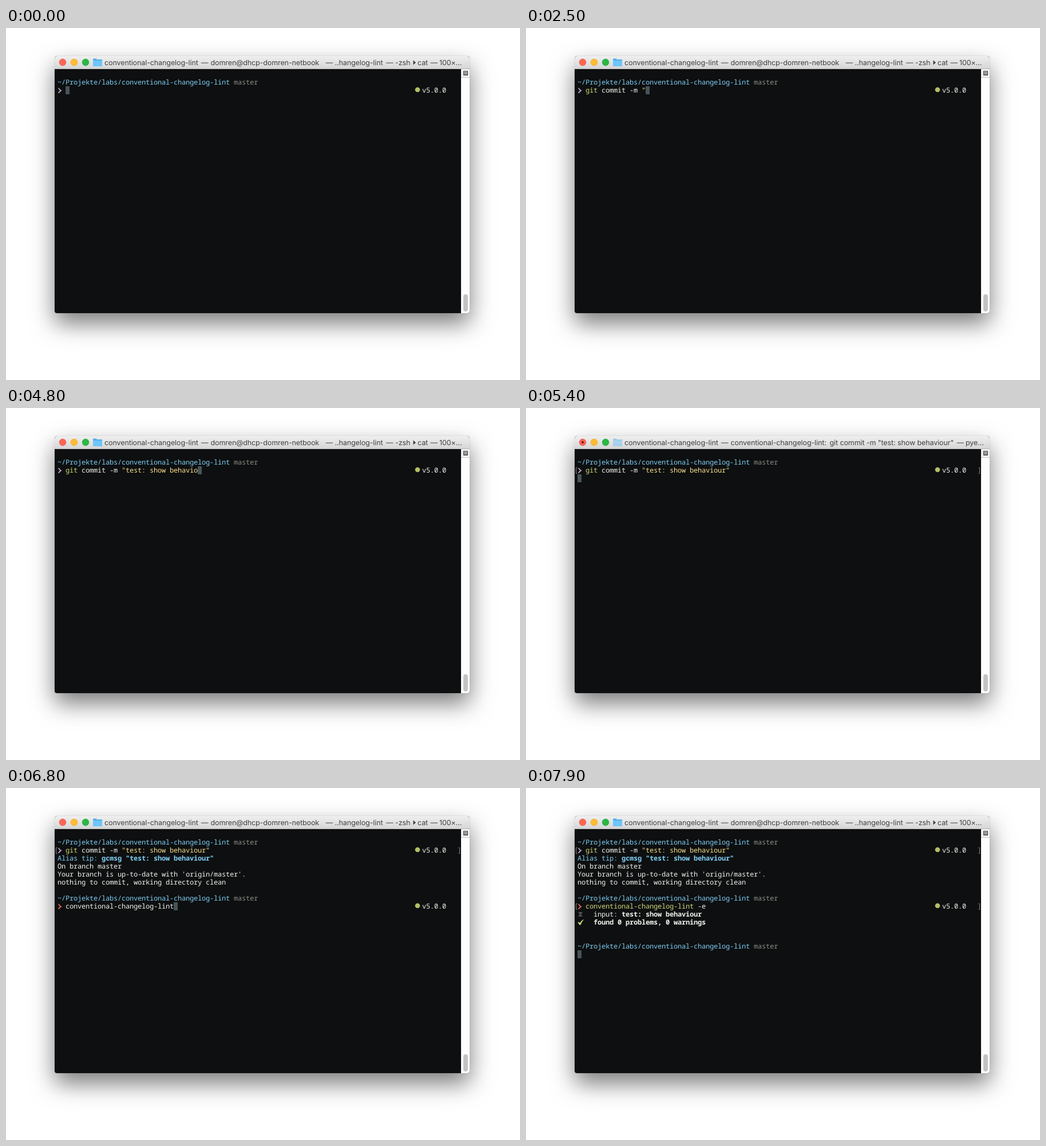
These frames come from a looping animation (898 px wide and 616 px high, 8000 ms). An HTML page:

```html
<!DOCTYPE html>
<html lang="en">
<head>
<meta charset="utf-8">
<title>Terminal</title>
<style>
html, body { margin: 0; width: 100%; height: 100%; overflow: hidden; background: #fff; }
#win {
  position: absolute; left: 85px; top: 49px; width: 725px; height: 450px; border-radius: 5px 5px 4px 4px;
  box-shadow: 0 18px 40px rgba(0,0,0,.52), 0 0 1px rgba(0,0,0,.45);
}
svg { position: absolute; left: 0; top: 0; display: block; }
text { white-space: pre; text-rendering: geometricPrecision; }
.mono { font: 12px "Noto Sans Mono", "DejaVu Sans Mono", monospace; letter-spacing: -.2px; }
.bold { font-weight: 700; }
.bar { font: 12.5px Inter, Roboto, sans-serif; letter-spacing: -.1px; fill: #404040; }
</style>
</head>
<body>
<div id="win"></div>
<svg id="stage" width="898" height="616" viewBox="0 0 898 616">
  <defs>
    <linearGradient id="chrome" x2="0" y2="1">
      <stop stop-color="#efefef"/><stop offset="1" stop-color="#d6d6d6"/>
    </linearGradient>
    <clipPath id="round"><path d="M85 54a5 5 0 0 1 5-5H805a5 5 0 0 1 5 5V495a4 4 0 0 1-4 4H89a4 4 0 0 1-4-4z"/></clipPath>
  </defs>
  <g clip-path="url(#round)">
    <rect x="85" y="49" width="725" height="450" fill="#0d0f10"/>
    <rect x="85" y="49" width="725" height="22" fill="url(#chrome)"/>
    <rect x="85" y="71" width="725" height="1" fill="#b4b4b4"/>
    <rect x="795" y="72" width="15" height="427" fill="#fdfdfd"/>
    <rect x="795" y="72" width="15" height="14" fill="#f2f2f2"/>
    <rect x="795" y="86" width="15" height="1" fill="#c4c4c4"/>
    <rect x="799.5" y="75.5" width="7" height="7" fill="#ddd" stroke="#444"/>
    <path d="M800 77.5h6M800 79.5h6M800 81.5h6" stroke="#555"/>
    <rect x="799" y="466" width="8" height="30" rx="4" fill="#c3c3c3"/>
  </g>
  <g stroke-width=".6">
    <circle cx="99" cy="60" r="5.9" fill="#fc6454" stroke="#df4d40"/>
    <circle cx="119" cy="60" r="5.9" fill="#fdbc32" stroke="#dfa023"/>
    <circle cx="139" cy="60" r="5.9" fill="#2ab845" stroke="#1da234"/>
  </g>
  <circle id="dot" cx="99" cy="60" r="1.9" fill="#5e120c"/>
  <g id="folder">
    <path d="M152 54.5q0-1 1-1h4.500l1.500 1.500h8q1 0 1 1v10q0 1-1 1h-14q-1 0-1-1z" fill="#53aeea"/>
    <path d="M152 57h16v9q0 1-1 1h-14q-1 0-1-1z" fill="#6ec5f9"/>
  </g>
</svg>
<script>
const LOOP = 8000, CELL = 7, ROW = 14, LEFT = 90, TOP = 88;
const C = {
  white: '#f3f3ee', blue: '#80cff5', gray: '#8d8d87', olive: '#d2d878',
  string: '#fbe08c', purple: '#c6a9d4', red: '#f0705a', cursor: '#475459'
};
const REPO = 'conventional-changelog-lint';
const COMMIT = 'git commit -m "test: show behaviour"';
const LINT = REPO + ' -e';

const stage = document.getElementById('stage');
const timed = [];

function add(tag, attrs, parent = stage) {
  const el = document.createElementNS('http://www.w3.org/2000/svg', tag);
  for (const k in attrs) el.setAttribute(k, attrs[k]);
  parent.appendChild(el);
  return el;
}

// Group that is visible in [from, to) of the given spans
function during(...spans) {
  const el = add('g', {});
  timed.push({ el, spans });
  return el;
}

function label(x, y, str, attrs, parent) {
  const el = add('text', { x, y, ...attrs }, parent);
  el.textContent = str;
  return el;
}

const colX = col => LEFT + col * CELL;
const rowY = row => TOP + row * ROW;

function cells(row, col, str, fill, parent, bold) {
  return label(colX(col), rowY(row) + 11, str, { fill, class: bold ? 'mono bold' : 'mono' }, parent);
}

function pathLine(row, parent) {
  cells(row, 0, '~/Projekte/labs/' + REPO, C.blue, parent);
  cells(row, 44, 'master', C.gray, parent);
}

function promptLine(row, color, parent) {
  const y = rowY(row);
  add('path', { d: `M92 ${y + 16.5 - 14 + 14 - 0}`, fill: 'none' }, parent).remove();
  add('path', {
    d: `M91.800 ${y + 3}Q93 ${y + 6} 96 ${y + 7.5}Q93 ${y + 9} 91.800 ${y + 12}`,
    fill: 'none', stroke: color, 'stroke-width': 1.7
  }, parent);
  add('circle', { cx: 719, cy: y + 6, r: 4.3, fill: '#b5bd68' }, parent);
  cells(row, 91, 'v5.0.0', C.white, parent);
}

function brackets(row, parent) {
  const y = rowY(row) + 2;
  add('path', {
    d: `M89.500 ${y + .5}h-2v10h2M790.500 ${y + .5}h2v10h-2`,
    fill: 'none', stroke: '#85857f'
  }, parent);
}

// Window titles
function title(parts, parent) {
  for (const [x, str] of parts) label(x, 65, str, { class: 'bar' }, parent);
}

const idle = during([0, 5200], [5800, 7300], [7800, LOOP]);
title([[172, REPO], [341, '—'], [357.5, 'domren@dhcp-domren-netbook'], [558.5, '—'],
  [574.5, '..hangelog-lint'], [664, '—'], [680, '-zsh'], [719, 'cat'],
  [741.5, '—'], [757, '100×…']], idle);
add('path', { d: 'M711.500 56.500l4.500 4-4.500 4z', fill: '#404040' }, idle);

const running = [[5200, 5800], [7300, 7800]];
title([[172, REPO], [341, '—'], [357.5, REPO + ':']], during(...running));
title([[530.5, 'git commit -m "test: show behaviour"'], [752.5, '—'], [768, 'pye…']], during(running[0]));
title([[530.5, LINT], [720, '— pye…']], during(running[1]));

// First command
const cursor = add('rect', { width: CELL, height: ROW, fill: C.cursor });
const first = during([0, LOOP]);
pathLine(0, first);
promptLine(1, C.purple, first);
const typed1 = [cells(1, 2, '', C.olive), cells(1, 5, '', C.white), cells(1, 16, '', C.string)];
brackets(1, during([5200, LOOP]));

const tip = during([5500, LOOP]);
cells(2, 0, 'Alias tip:', C.blue, tip);
cells(2, 11, 'gcmsg "test: show behaviour"', C.blue, tip, true);

const status = during([5800, LOOP]);
['On branch master', "Your branch is up-to-date with 'origin/master'.",
  'nothing to commit, working directory clean']
  .forEach((line, i) => cells(3 + i, 0, line, C.white, status));

// Second command
pathLine(7, status);
promptLine(8, C.red, status);
const typed2 = [cells(8, 2, '', C.white), cells(8, 29, '', C.white)];
brackets(8, during([7300, LOOP]));

const report = during([7700, LOOP]);
add('path', { d: 'M91.500 217h7v1.200l-2.500 2.800 2.500 2.800v1.200h-7v-1.200l2.500-2.800-2.500-2.800z', fill: '#4c5254' }, report);
cells(9, 4, 'input:', C.white, report);
cells(9, 11, 'test: show behaviour', C.white, report, true);
add('path', { d: 'M90.500 235.500l2-1.200 1.700 2.200q2.300-4.500 6-6.500l.500.600q-3.200 3.600-5.200 9h-2z', fill: C.olive }, report);
cells(10, 4, 'found 0 problems, 0 warnings', C.white, report, true);

pathLine(13, during([7800, LOOP]));

const clamp = (v, max) => Math.max(0, Math.min(max, Math.floor(v)));

function count1(t) {
  return clamp((t - 700) / 95, 15) + clamp((t - 3200) / 85, 21);
}

function count2(t) {
  if (t < 6600) return clamp((t - 6150) / 90, 4);
  return REPO.length + clamp((t - 6800) / 100, 3);
}

function cursorCell(t) {
  if (t < 5200) return [1, 2 + count1(t)];
  if (t < 5500) return [2, 0];
  if (t < 5800) return [3, 0];
  if (t < 7300) return [8, 2 + count2(t)];
  if (t < 7700) return [9, 0];
  if (t < 7800) return [12, 0];
  return [14, 0];
}

function render(time) {
  const t = Math.floor(time % LOOP / 100) * 100;
  for (const { el, spans } of timed) {
    const on = spans.some(([from, to]) => t >= from && t < to);
    el.setAttribute('display', on ? 'inline' : 'none');
  }
  const isBusy = running.some(([from, to]) => t >= from && t < to);
  document.getElementById('dot').setAttribute('display', isBusy ? 'inline' : 'none');
  document.getElementById('folder').setAttribute('opacity', isBusy ? .5 : 1);

  const one = COMMIT.slice(0, count1(t));
  typed1[0].textContent = one.slice(0, 3);
  typed1[0].setAttribute('fill', one.length < 3 ? C.white : C.olive);
  typed1[1].textContent = one.slice(3, 14);
  typed1[2].textContent = one.slice(14);

  const two = LINT.slice(0, count2(t));
  typed2[0].textContent = two.slice(0, 27);
  typed2[0].setAttribute('fill', t < 6900 ? C.white : C.olive);
  typed2[1].textContent = two.slice(27);

  const [row, col] = cursorCell(t);
  cursor.setAttribute('x', colX(col));
  cursor.setAttribute('y', rowY(row));
}

const start = performance.now();
function tick() {
  render(performance.now() - start);
  requestAnimationFrame(tick);
}
render(0);
requestAnimationFrame(tick);
</script>
</body>
</html>
```
